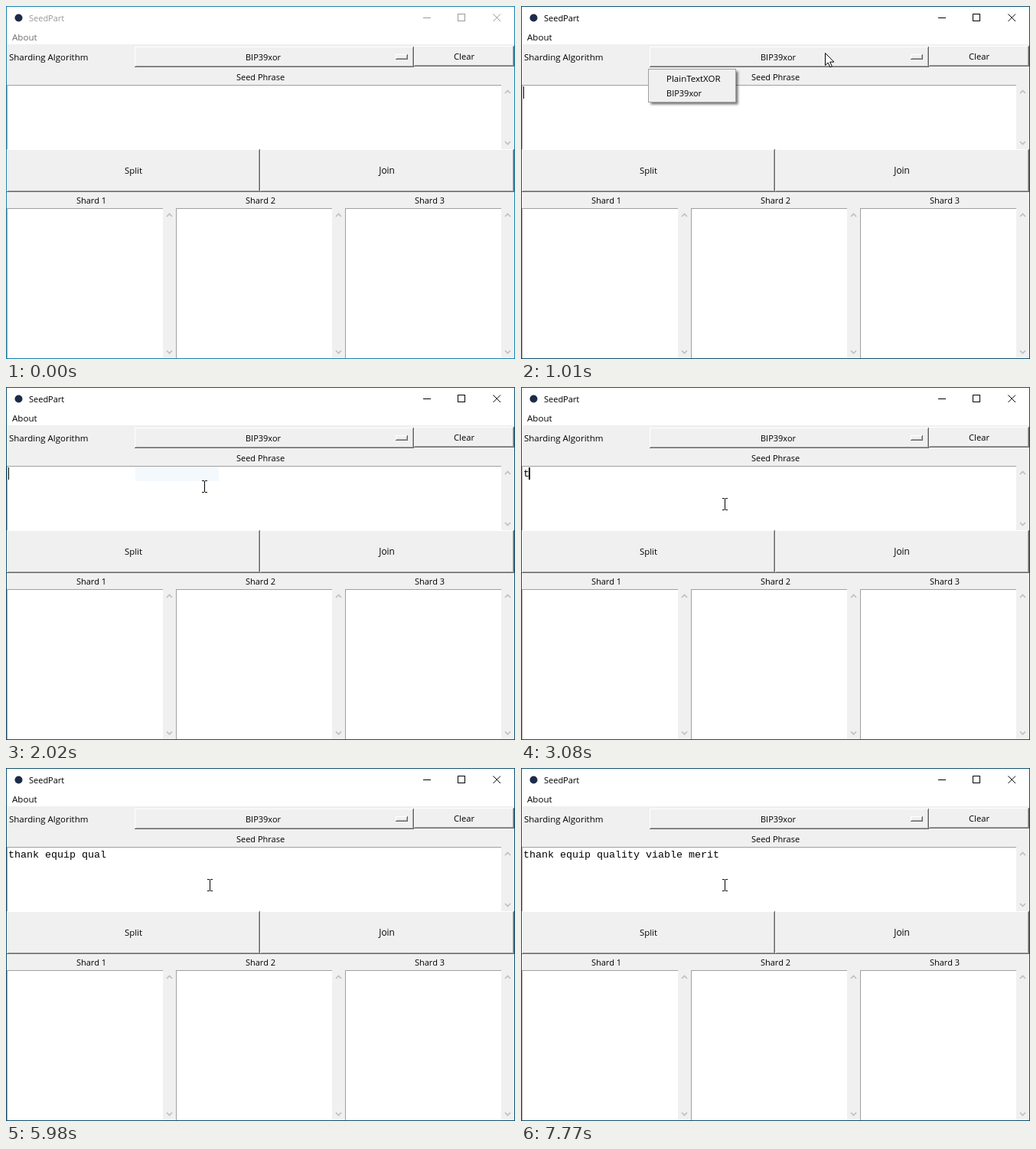
An HTML page with a canvas that plays this animation: 665x461 px, repeating every 8 s.

```html
<!DOCTYPE html>
<html lang="en">
<head>
<meta charset="utf-8">
<title>SeedPart</title>
<style>
html, body { margin: 0; width: 100%; height: 100%; overflow: hidden; background: #f0f0f0; }
canvas { display: block; }
</style>
</head>
<body>
<canvas id="stage" width="665" height="461"></canvas>
<script>
const ctx = document.getElementById('stage').getContext('2d');
const LOOP = 8000, TICK = 78, START = 130;
const ACTIVATE = 770, PICK = 1620;
const UI = '"Open Sans", "Noto Sans", sans-serif';
const MONO = '"Liberation Mono", "Courier New", monospace';
const PHRASE = 'thank equip quality viable merit';

// Moment at which each character of the phrase appears.
const KEYS = [
  3080, 3250, 3400, 3480, 3560, 3630, 4030, 4100, 4420, 4650, 4730, 5430,
  5660, 5740, 5890, 5980, 6040, 6130, 6210, 6360, 6510, 6680, 6760, 6840,
  6920, 7000, 7150, 7230, 7310, 7390, 7700, 7770
];
// The caret switches on, off, on ... at these moments.
const BLINKS = [770, 1390, 1700, 2320, 2610, 3250, 3560, 4100, 4420, 5030, 5350, 5950, 6280, 6840, 7150, 7750];
// Pointer path: time, x, y.
const PATH = [
  [130, 533, 426], [598, 397, 63], [750, 397, 63], [770, 397, 61],
  [1020, 397, 61], [1540, 252, 108], [1700, 252, 108], [2310, 266, 152],
  [2545, 266, 152], [2560, 266, 153]
];

const clamp = v => Math.max(0, Math.min(1, v));
const countUntil = (times, t) => times.filter(v => v <= t).length;

function rect(x, y, w, h, color) {
  ctx.fillStyle = color;
  ctx.fillRect(x, y, w, h);
}

function label(str, x, y, size, { color = '#000', align = 'left', font = UI } = {}) {
  ctx.font = `${size}px ${font}`;
  ctx.textAlign = align;
  ctx.fillStyle = color;
  ctx.fillText(str, x, y);
}

const centered = (str, x, y, size) => label(str, x, y, size, { align: 'center' });

function polyline(points, color, width = 1) {
  ctx.beginPath();
  points.forEach(([x, y]) => ctx.lineTo(x, y));
  ctx.strokeStyle = color;
  ctx.lineWidth = width;
  ctx.stroke();
}

function raised(x, y, w, h) {
  rect(x, y, w, h, '#696969');
  rect(x, y, w - 1, h - 1, '#fff');
  rect(x + 1, y + 1, w - 2, h - 2, '#a0a0a0');
  rect(x + 1, y + 1, w - 3, h - 3, '#f0f0f0');
}

function chevron(x, y, dir) {
  polyline([[x - 3.5, y + 2 * dir], [x, y - 1.5 * dir], [x + 3.5, y + 2 * dir]], '#bfbfbf', 1.7);
}

function textArea(x, y, w, h) {
  rect(x, y, w, h, '#fff');
  rect(x, y, w, 1, '#a0a0a0');
  rect(x, y, 1, h, '#a0a0a0');
  chevron(x + w + 8.5, y + 9, 1);
  chevron(x + w + 8.5, y + h - 8, -1);
}

function titleBar(active) {
  const ink = active ? '#000' : '#999';
  rect(0, 0, 665, 50, '#fff');
  ctx.fillStyle = '#1c2c48';
  ctx.beginPath();
  ctx.arc(16.5, 15.5, 5, 0, Math.PI * 2);
  ctx.fill();
  label('SeedPart', 30, 20, 11, { color: ink });
  label('About', 8, 45, 11.6, { color: active ? '#000' : '#6d6d6d' });
  rect(545, 15, 10, 1, ink);
  ctx.strokeStyle = ink;
  ctx.lineWidth = 1;
  ctx.strokeRect(590.5, 10.5, 9, 9);
  polyline([[636.5, 10.5], [646, 20]], ink);
  polyline([[646, 10.5], [636.5, 20]], ink);
}

function windowBody(active) {
  rect(0, 0, 665, 461, '#f0f0f0');
  titleBar(active);

  label('Sharding Algorithm', 4, 71, 11.5);
  raised(168, 53, 365, 27);
  centered('BIP39xor', 336, 71, 11);
  raised(509, 63, 16, 7);
  raised(533, 52, 131, 27);
  centered('Clear', 598.5, 70, 11.2);

  centered('Seed Phrase', 332.5, 97, 11);
  textArea(1, 103, 646, 84);
  raised(1, 187, 331, 56);
  raised(332, 187, 332, 56);
  centered('Split', 166.5, 219, 11.4);
  centered('Join', 497.5, 219, 11.8);

  [1, 222, 443].forEach((x, i) => {
    centered(`Shard ${i + 1}`, x + 110.5, 258, 11);
    textArea(x, 264, i ? 204 : 204, 196);
  });

  ctx.strokeStyle = active ? '#10506e' : '#1c80ad';
  ctx.lineWidth = 1;
  ctx.strokeRect(0.5, 0.5, 664, 460);
}

function menuItem(name, y, selected) {
  if (selected) rect(169, y, 109, 19, '#0078d7');
  label(name, 190, y + 14, name === 'BIP39xor' ? 11 : 11.5, { color: selected ? '#fff' : '#000' });
}

function menu(t, [px, py]) {
  ctx.save();
  if (t < PICK) {
    ctx.globalAlpha = clamp((t - ACTIVATE) / 210);
    ctx.save();
    ctx.shadowColor = 'rgba(0,0,0,.55)';
    ctx.shadowBlur = 3;
    ctx.shadowOffsetX = ctx.shadowOffsetY = 2.5;
    rect(166, 82, 115, 44, '#a0a0a0');
    ctx.restore();
    rect(167, 83, 113, 42, '#f0f0f0');
    const over = y => px > 166 && px < 281 && py >= y && py < y + 19;
    menuItem('PlainTextXOR', 85, over(85));
    menuItem('BIP39xor', 104, over(104));
  } else {
    ctx.globalAlpha = clamp(1 - (t - PICK) / 400);
    menuItem('BIP39xor', 104, true);
  }
  ctx.restore();
}

function typing(t) {
  const count = countUntil(KEYS, t);
  label(PHRASE.slice(0, count), 3, 117, 13.333, { font: MONO });
  if (countUntil(BLINKS, t) % 2) {
    const x = Math.max(3, 2 + 8 * count);
    rect(x, 105, 4 + 8 * count - x, 16, '#000');
  }
}

function pointerAt(t) {
  const next = PATH.findIndex(p => p[0] > t);
  if (next < 0) return PATH[PATH.length - 1].slice(1);
  const [t0, x0, y0] = PATH[Math.max(0, next - 1)];
  const [t1, x1, y1] = PATH[next];
  const k = clamp((t - t0) / (t1 - t0));
  const e = k * k * (3 - 2 * k);
  return [Math.round(x0 + (x1 - x0) * e), Math.round(y0 + (y1 - y0) * e)];
}

function arrow(x, y) {
  const shape = [[0, 0], [0, 16], [3.7, 12.6], [6.4, 18.4], [8.8, 17.4], [6.2, 11.6], [11.4, 11.6]];
  ctx.beginPath();
  shape.forEach(([dx, dy]) => ctx.lineTo(x + 0.5 + dx, y + 0.5 + dy));
  ctx.closePath();
  ctx.fillStyle = '#fff';
  ctx.fill();
  ctx.strokeStyle = '#000';
  ctx.lineWidth = 1;
  ctx.stroke();
}

// The text pointer inverts whatever lies below it.
function beam(x, y) {
  ctx.save();
  ctx.globalCompositeOperation = 'difference';
  for (const top of [y - 8, y + 7]) {
    rect(x - 3, top, 3, 1, '#fff');
    rect(x + 1, top, 3, 1, '#fff');
  }
  rect(x, y - 7, 1, 14, '#fff');
  ctx.restore();
}

function draw(t) {
  const tick = START + Math.floor((t - START) / TICK + 0.1) * TICK;
  const pos = pointerAt(tick);
  windowBody(t >= ACTIVATE);
  typing(t);
  if (t >= ACTIVATE) menu(t < PICK ? tick : Math.max(tick, PICK), pos);
  if (t >= PICK) beam(...pos);
  else if (t >= START) arrow(...pos);
}

function frame() {
  draw(performance.now() % LOOP);
  requestAnimationFrame(frame);
}
frame();
</script>
</body>
</html>
```
